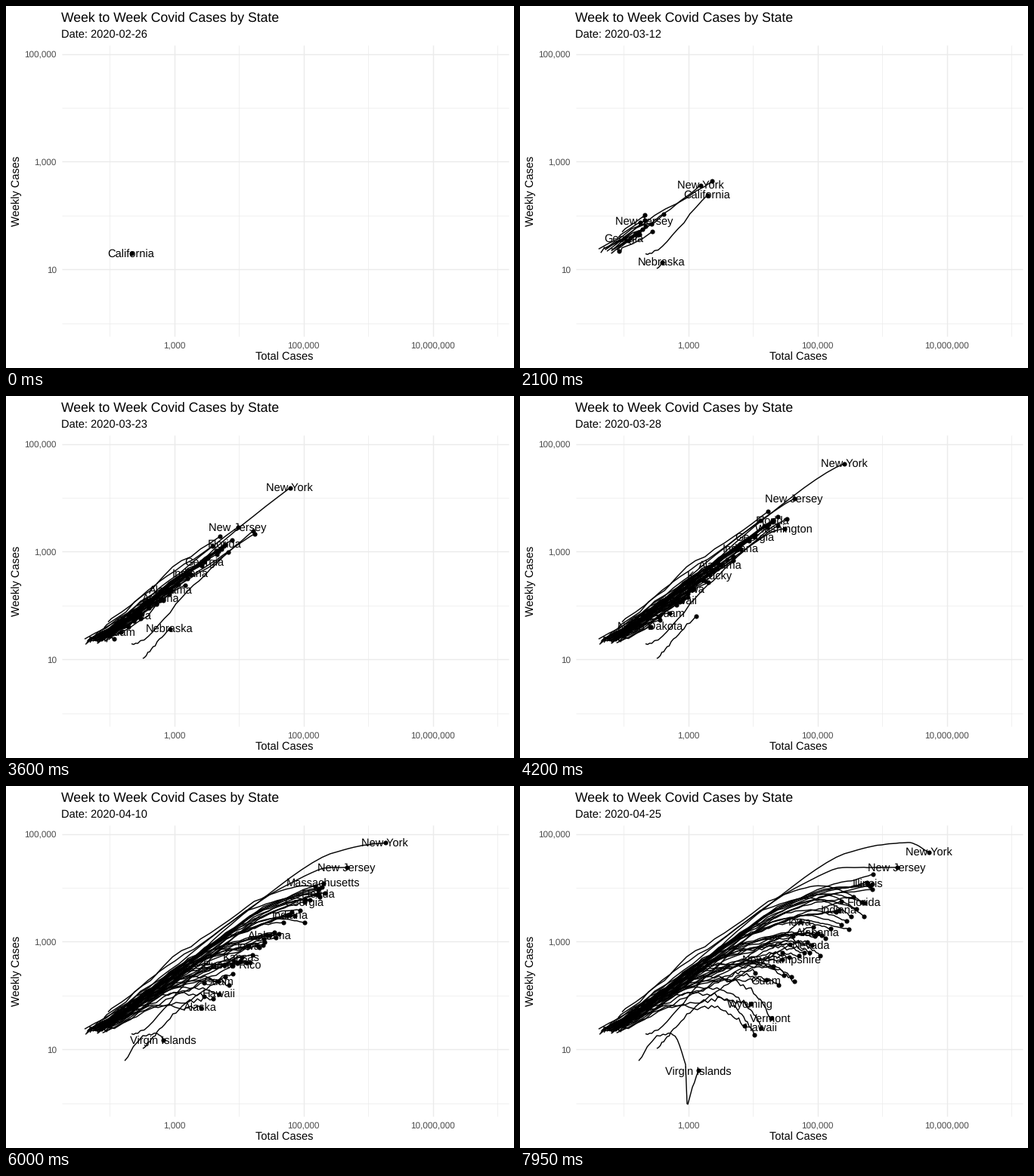
A matplotlib script that plays this animation: 672x480 px, repeating every 8000 ms.

```python
import numpy as np
import matplotlib.pyplot as plt
from matplotlib.animation import FuncAnimation
from matplotlib.collections import LineCollection

W, H, DPI = 672, 480, 96
STEPS, TICKS_PER_STEP = 54, 3
LAST = STEPS - 1
rng = np.random.default_rng(8)
plt.rcParams.update({"font.family": "Liberation Sans", "text.hinting": "none"})

# The crowd at a few moments: distance still to travel, and the line it lies
# along (height at x = 300, slope).
MOMENTS = np.array([5, 14, 19, 28, 35, 45, LAST])
TO_GO = np.array([420, 292, 236, 126, 70, 24, 0])
LEVEL = np.array([193, 193, 182, 195, 228, 262, 285])
SLOPE = np.array([.75, .75, .8, .87, .95, .9, .9])

# Outliers, as a few (step, x, y) points each.
OUTLIERS = {
    "New York": [(6, 128, 325), (14, 239, 237), (19, 298, 183), (28, 429, 90),
                 (35, 478, 78), (43, 513, 75), (LAST, 541, 88)],
    "New Jersey": [(10, 115, 326), (19, 229, 234), (28, 363, 136), (35, 427, 108), (LAST, 499, 108)],
    "California": [(0, 166, 329), (4, 178, 326), (14, 248, 251), (28, 353, 163), (LAST, 466, 130)],
    "Washington": [(3, 104, 323), (14, 254, 233), (28, 350, 176), (LAST, 435, 190)],
    "Nebraska": [(11, 181, 349), (19, 200, 327), (28, 233, 293), (LAST, 357, 210)],
    "Virgin Islands": [(28.4, 157, 364), (32, 181, 332), (37, 199, 328), (44, 219, 371),
                       (45, 221, 421), (48, 222, 421), (50, 228, 399), (LAST, 236, 378)],
}
# Where the others stand at the end; the order decides which label wins.
ENDS = {
    "Florida": (456, 155), "Alabama": (394, 195), "Georgia": (441, 147),
    "Massachusetts": (467, 117), "Illinois": (460, 130), "Michigan": (463, 133),
    "Indiana": (422, 165), "Louisiana": (455, 173), "Maryland": (425, 153),
    "Iowa": (371, 179), "Nevada": (386, 211), "Missouri": (399, 198),
    "Arizona": (388, 188), "Kentucky": (380, 207), "Guam": (326, 258),
    "Hawaii": (319, 317), "Puerto Rico": (347, 220), "Kansas": (361, 199),
    "New Hampshire": (347, 232), "Montana": (310, 330), "Alaska": (297, 320),
    "Vermont": (332, 308), "Idaho": (359, 253), "North Dakota": (311, 246),
    "Wyoming": (305, 292),
}
LABEL_ORDER = ["New York", "New Jersey", *ENDS, "California", "Washington",
               "Nebraska", "Virgin Islands"]
UNNAMED = 20


def smooth(t, v, at):
    """Monotone cubic through (t, v)."""
    h = np.diff(t)
    d = np.diff(v) / h
    total = d[:-1] + d[1:]
    inner = 2 * np.maximum(d[:-1] * d[1:], 0) / (total + (total == 0))
    m = np.r_[d[0], inner, d[-1]]
    i = np.clip(np.searchsorted(t, at, side="right") - 1, 0, len(h) - 1)
    u = (at - t[i]) / h[i]
    return (v[i] * (1 + 2 * u) * (1 - u) ** 2 + v[i + 1] * u * u * (3 - 2 * u)
            + h[i] * (m[i] * u * (1 - u) ** 2 - m[i + 1] * u * u * (1 - u)))


def steps_from(start):
    return np.r_[start, np.arange(np.floor(start) + 1, STEPS)]


def wobble(y, scale):
    """Daily noise, stronger where the counts are small."""
    return rng.normal(0, scale, len(y)) * np.clip((y - 120) / 90, .2, 1.8)


def outlier_path(points):
    t, x, y = np.array(points, float).T
    times = steps_from(t[0])
    py = smooth(t, y, times)
    return times, np.column_stack([smooth(t, x, times), py + wobble(py, .5)])


def crowd_line(step, x):
    level, slope = (np.interp(step, MOMENTS, v) for v in (LEVEL, SLOPE))
    return level - slope * (x - 300)


def crowd_path(x_end, y_end, spread=0):
    """Climb with the crowd, then drift to the given end."""
    excess = y_end - crowd_line(LAST, x_end)
    lead = np.clip(excess / 300, -.12, .25)

    def x_at(step):
        return x_end - (1 - lead) * smooth(MOMENTS, TO_GO, step)

    x_start, y_start = rng.uniform(104, 142), rng.uniform(318, 332)
    all_steps = np.linspace(MOMENTS[0], LAST, 200)
    times = steps_from(np.interp(x_start, x_at(all_steps), all_steps))
    x = x_at(times)
    drift = np.clip((times - 30) / (LAST - 30), 0, 1) ** 1.5
    y = crowd_line(times, x) + excess * drift + rng.normal(0, spread) * (1 - drift)
    y = np.minimum(y, np.maximum(y_start - .5 * (x - x_start), y_end))
    return times, np.column_stack([x, y + wobble(y, 1)])


paths = [outlier_path(OUTLIERS[name]) if name in OUTLIERS else crowd_path(*ENDS[name])
         for name in LABEL_ORDER]
for x in np.linspace(335, 466, UNNAMED):
    paths.append(crowd_path(x, crowd_line(LAST, x) + rng.normal(0, 11), spread=6))

fig = plt.figure(figsize=(W / DPI, H / DPI), dpi=DPI, facecolor="white")
ax = fig.add_axes([0, 0, 1, 1])
ax.set(xlim=(0, W), ylim=(H, 0))
ax.axis("off")

LEFT, RIGHT, TOP, BOTTOM = 73.5, 664.5, 52, 438
X_MAJOR = 222.5 + 171 * np.arange(3)
Y_MAJOR = 63.6 + 142.8 * np.arange(3)


def grid(xs, ys, width):
    ax.vlines(xs, TOP, BOTTOM, color="#EBEBEB", lw=width)
    ax.hlines(ys, LEFT, RIGHT, color="#EBEBEB", lw=width)


grid(137 + 171 * np.arange(4), Y_MAJOR + 71.4, .53)
grid(X_MAJOR, Y_MAJOR, 1.07)
for x, value in zip(X_MAJOR, (10**3, 10**5, 10**7)):
    ax.text(x, 453, f"{value:,}", size=8.8, color="#4D4D4D", ha="center")
for y, value in zip(Y_MAJOR, (10**5, 10**3, 10)):
    ax.text(67, y + 4.2, f"{value:,}", size=8.8, color="#4D4D4D", ha="right")
ax.text(73, 20, "Week to Week Covid Cases by State", size=13.2)
ax.text(368.7, 470, "Total Cases", size=11, ha="center")
ax.text(18, 245, "Weekly Cases", size=11, rotation=90, rotation_mode="anchor", ha="center")
date = ax.text(73, 42, "", size=11)

lines = LineCollection([], colors="black", linewidths=1.07, zorder=3)
ax.add_collection(lines, autolim=False)
dots, = ax.plot([], [], "o", color="black", ms=4.6, mew=0, zorder=4)
labels = [ax.text(0, 0, name, size=11, ha="center", zorder=5) for name in LABEL_ORDER]
half_widths = [label.get_window_extent().width / 2 for label in labels]
LABEL_HEIGHT = 9.8


def draw(tick):
    step = tick // TICKS_PER_STEP
    day = int(step * 111 / 99)
    date.set_text(f"Date: {np.datetime64('2020-02-26') + day}")
    trails = [xy[:np.searchsorted(t, step, side="right")] for t, xy in paths]
    lines.set_segments([trail for trail in trails if len(trail) > 1])
    dots.set_data(*np.array([trail[-1] for trail in trails if len(trail)]).T)

    # A label is left out where it would cover one already placed.
    placed = []
    for label, half, trail in zip(labels, half_widths, trails):
        visible = len(trail) > 0
        if visible:
            x, y = trail[-1]
            visible = not any(abs(x - a) < half + w and abs(y - b) < LABEL_HEIGHT
                              for a, b, w in placed)
        label.set_visible(visible)
        if visible:
            label.set_position((x - .5, y + 5.2))
            placed.append((x, y, half))
    return [lines, dots, date, *labels]


# The last step is cut short so that one loop lasts 8000 ms.
anim = FuncAnimation(fig, draw, frames=STEPS * TICKS_PER_STEP - 2, interval=50,
                     repeat=True, repeat_delay=0)
plt.show()
```
